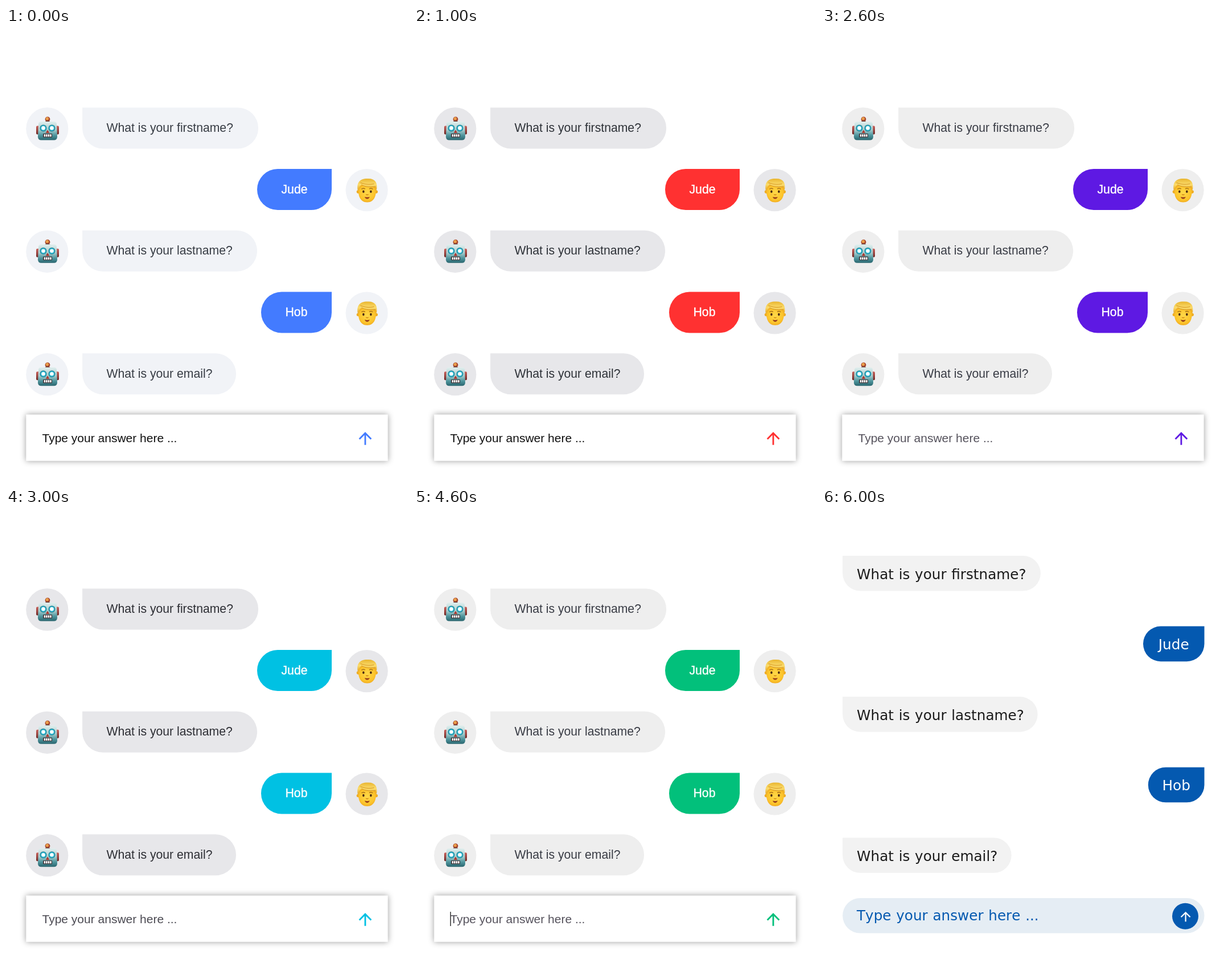
Animation, 706 px wide and 794 px high, one loop 7000 ms. Source, as an HTML page:

```html
<!DOCTYPE html>
<html lang="en">
<head>
<meta charset="utf-8">
<title>Chat themes</title>
<style>
  html, body { margin: 0; width: 100%; height: 100%; overflow: hidden; background: #fff; }
  svg { display: block; width: 706px; height: 794px; }
  .classic { font: 21.2px "Liberation Sans", Arial, sans-serif; }
  .classic .hint { font-size: 21px; }
  .classic .reply { stroke: #fff; stroke-width: .35px; }
  .round { font: 24.7px "DejaVu Sans", Verdana, sans-serif; font-kerning: none; word-spacing: .034em; }
  .reply { fill: #fff; text-anchor: middle; }
  .box { fill: #fff; filter: drop-shadow(0 0 5.5px rgba(0, 0, 0, .4)); }
</style>
</head>
<body>
<svg viewBox="0 0 706 794" xmlns="http://www.w3.org/2000/svg">
  <defs>
    <linearGradient id="steel" x2="0" y2="1">
      <stop offset="0" stop-color="#e3efee"/>
      <stop offset=".45" stop-color="#a5cfd0"/>
      <stop offset=".75" stop-color="#4d939b"/>
      <stop offset="1" stop-color="#2a666f"/>
    </linearGradient>
    <linearGradient id="ear" x2="0" y2="1">
      <stop offset="0" stop-color="#c9605a"/>
      <stop offset="1" stop-color="#6f2724"/>
    </linearGradient>
    <radialGradient id="skin" cy=".45" r=".6">
      <stop offset="0" stop-color="#ffd94a"/>
      <stop offset=".7" stop-color="#fcc42c"/>
      <stop offset="1" stop-color="#eda31c"/>
    </radialGradient>
    <linearGradient id="hair" x2="0" y2="1">
      <stop offset="0" stop-color="#e9b52f"/>
      <stop offset=".5" stop-color="#fbdc6c"/>
      <stop offset="1" stop-color="#dfa226"/>
    </linearGradient>

    <g id="bot">
      <rect x="-20" y="-5" width="6" height="15" rx="2" fill="url(#ear)"/>
      <rect x="14" y="-5" width="6" height="15" rx="2" fill="url(#ear)"/>
      <circle cy="-16.6" r="4.4" fill="#a8452d"/>
      <circle cx="-.6" cy="-17.6" r="2.6" fill="#e9a04a"/>
      <path d="M-5-11.500Q-4-14 0-14T5-11.500Z" fill="#5f3a35"/>
      <path d="M-11-12.500H11Q16-12.500 16-8L17 14Q17 20 11 20H-11Q-17 20-17 14L-16-8Q-16-12.500-11-12.500Z" fill="url(#steel)"/>
      <g id="eye" transform="translate(-7.5 -1)">
        <circle r="6" fill="#2b7484"/>
        <circle r="5.200" fill="#24b2cc"/>
        <circle r="3.300" fill="#fff"/>
      </g>
      <use href="#eye" x="15"/>
      <path d="M0 2L3.200 7.700H-3.200Z" fill="#b3352c"/>
      <rect x="-8" y="8.700" width="16" height="6.600" rx="1.200" fill="#3d3337"/>
      <path d="M-6.300 12H6.700" stroke="#fff" stroke-width="4.200" stroke-dasharray="2.500 1"/>
    </g>

    <g id="man">
      <circle cx="-15.800" cy="3" r="2.800" fill="#eeab22"/>
      <circle cx="15.800" cy="3" r="2.800" fill="#eeab22"/>
      <path d="M-15.500-9C-17 9-13 21.500 0 21.500S17 9 15.500-9Z" fill="url(#skin)"/>
      <path d="M-16.500 1C-19-13-13-20 0-20C14-21 19-13 16.500 1L14.800-6C7-5-2-5-10-9C-13-7-15-4-15-1Z" fill="url(#hair)"/>
      <path d="M-10-9.500C-3-5 7-5 14.800-6.200M-12-13C-5-10 4-9 12-11" fill="none" stroke="#d4921f" stroke-width="1"/>
      <path d="M-10-1.600Q-7-4-3.600-2M10-1.600Q7-4 3.600-2" fill="none" stroke="#b27a1b" stroke-width="1.700"/>
      <ellipse cx="-6.500" cy="2.600" rx="1.800" ry="2.300" fill="#4b2c15"/>
      <ellipse cx="6.500" cy="2.600" rx="1.800" ry="2.300" fill="#4b2c15"/>
      <path d="M-2.200 7.500Q0 9.400 2.200 7.500" fill="none" stroke="#cf8516" stroke-width="1.400"/>
      <path d="M-4.500 11.800Q0 13.200 4.500 11.800Q3 15.400 0 15.400T-4.500 11.800Z" fill="#99401c"/>
    </g>

    <path id="arrow" d="M-8 0l1.410 1.410L-1-4.170V8h2V-4.170l5.580 5.590L8 0 0-8Z"/>
  </defs>
</svg>
<script>
const HOLD = 1000;
const HINT = 'Type your answer here ...';
const LINES = [
  { text: 'What is your firstname?', w: 309, wRound: 347.7 },
  { text: 'Jude', w: 131, wRound: 107.5, reply: true },
  { text: 'What is your lastname?', w: 307, wRound: 342.5 },
  { text: 'Hob', w: 124, wRound: 98.7, reply: true },
  { text: 'What is your email?', w: 270, wRound: 296.5 }
];
const THEMES = [
  { accent: '#437bff', bg: '#f1f3f7', ink: '#373c44', hint: '#101010' },
  { accent: '#ff3131', bg: '#e7e7ea', ink: '#2e3238', hint: '#101010' },
  { accent: '#5e19e3', bg: '#eeeeee', ink: '#393c45', hint: '#55525c' },
  { accent: '#00c1e3', bg: '#e7e7ea', ink: '#2d2e34', hint: '#4b4a52' },
  { accent: '#02c07b', bg: '#eeeeee', ink: '#393c45', hint: '#55525c', caret: true },
  { accent: '#2d2e2e', bg: '#e5e6e8', ink: '#26273a', hint: '#404253', plain: true },
  { accent: '#0459b0', bg: '#f2f2f2', ink: '#1c1c1c', hint: '#0459b0', field: '#e5edf4', round: true }
];

const rect = (x, y, w, h, extra) => `<rect x="${x}" y="${y}" width="${w}" height="${h}" ${extra}/>`;
const circle = (x, y, r, fill) => `<circle cx="${x}" cy="${y}" r="${r}" fill="${fill}"/>`;
const label = (x, y, text, extra) => `<text x="${x}" y="${y}" ${extra}>${text}</text>`;
const arrow = (x, y, scale, fill) =>
  `<use href="#arrow" transform="translate(${x} ${y}) scale(${scale})" fill="${fill}"/>`;

// Pill with one square corner at the top: left for questions, right for replies.
function bubble(x, y, w, h, r, square, fill) {
  const arc = (dx, dy) => `a${r} ${r} 0 0 1 ${dx} ${dy}`;
  const topLeft = square === 'left' ? `V${y}` : `V${y + r}${arc(r, -r)}`;
  const topRight = square === 'right' ? `H${x + w}` : `H${x + w - r}${arc(r, r)}`;
  return `<path fill="${fill}" d="M${x + r} ${y + h}${arc(-r, -r)}${topLeft}${topRight}V${y + h - r}${arc(-r, r)}Z"/>`;
}

function message(line, x, y, w, h, r, pad, base, theme) {
  const { text, reply } = line;
  return bubble(x, y, w, h, r, reply ? 'right' : 'left', reply ? theme.accent : theme.bg) +
    (reply ? label(x + w / 2, y + base, text, 'class="reply"')
           : label(x + pad, y + base, text, `fill="${theme.ink}"`));
}

function avatar(x, y, reply, { plain, accent, bg }) {
  const disc = circle(x, y, 37.1, plain && reply ? accent : bg);
  if (!plain) return disc + `<use href="#${reply ? 'man' : 'bot'}" x="${x + .7}" y="${y}"/>`;
  return disc + (reply
    ? `<path d="M${x} ${y - 17}l14.500 25.500h-29Z" fill="${bg}"/>`
    : rect(x - 12.7, y - 12.7, 25.5, 25.5, `fill="${accent}"`));
}

function classic(theme) {
  const rows = LINES.map((line, i) => {
    const y = 139.4 + i * 107.7;
    const x = line.reply ? 572 - line.w : 134.1;
    return avatar(line.reply ? 633.6 : 72.3, y + 37, line.reply, theme) +
      message(line, x, y, line.w, 72, 36, 42.3, 42.6, theme);
  });
  const { plain, accent, bg, hint, caret } = theme;
  return rows.join('') +
    rect(35.3, 677.5, 635.3, 81.2, 'class="box"') +
    (plain ? rect(589.4, 677.5, 81.2, 81.2, `fill="${accent}"`) : '') +
    label(63.5, 725.6, HINT, `class="hint" fill="${hint}"`) +
    (caret ? rect(63.5, 706, 1.5, 25, 'fill="#333"') : '') +
    arrow(630.9, 719.4, 1.42, plain ? bg : accent);
}

function round(theme) {
  const rows = LINES.map((line, i) =>
    message(line, line.reply ? 671.5 - line.wRound : 36.2, 82 + i * 123.55,
      line.wRound, 61.6, 30.8, 24.9, 40.5, theme));
  return rows.join('') +
    rect(36.2, 682, 635.3, 61.6, `rx="30.8" fill="${theme.field}"`) +
    label(61, 720.8, HINT, `fill="${theme.hint}"`) +
    circle(638, 713.8, 23, theme.accent) +
    arrow(638.6, 714.5, 1.1, '#fff');
}

const svg = document.querySelector('svg');
const total = HOLD * THEMES.length;
const share = 1 / THEMES.length;
THEMES.forEach((theme, i) => {
  const scene = document.createElementNS(svg.namespaceURI, 'g');
  scene.setAttribute('class', theme.round ? 'round' : 'classic');
  scene.innerHTML = theme.round ? round(theme) : classic(theme);
  svg.append(scene);
  scene.animate([
    { opacity: 1, offset: 0 }, { opacity: 1, offset: share },
    { opacity: 0, offset: share }, { opacity: 0, offset: 1 }
  ], { duration: total, delay: i ? i * HOLD - total : 0, iterations: Infinity });
});
</script>
</body>
</html>
```
